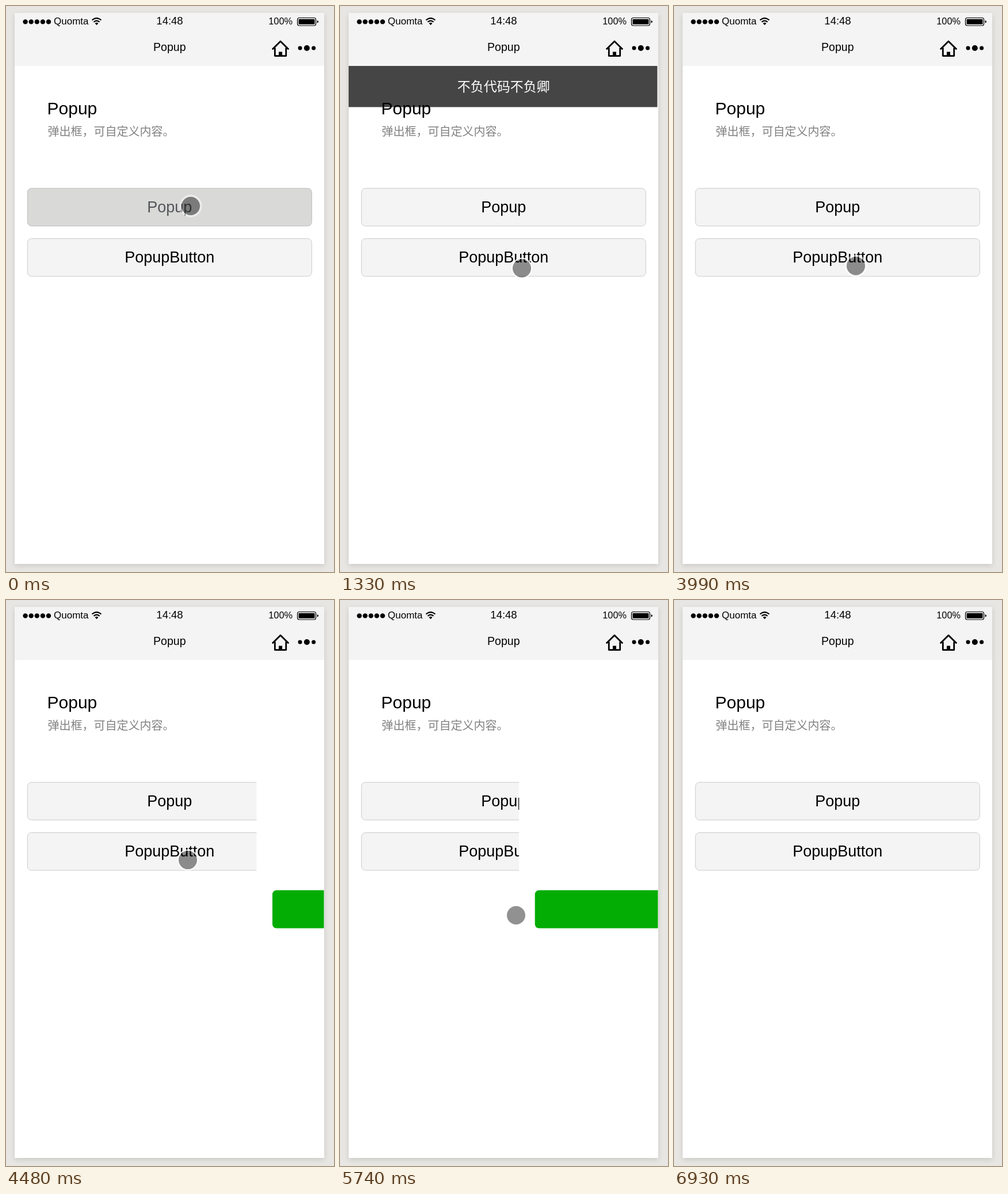
These frames come from a looping animation (570 px wide and 982 px high, 7 s). An HTML page:

```html
<!DOCTYPE html>
<html lang="zh-CN">
<head>
<meta charset="utf-8">
<title>Popup</title>
<style>
  html, body { margin: 0; width: 100%; height: 100%; overflow: hidden; background: #e7e6e2; }
  .phone { position: absolute; left: 15px; top: 12px; width: 538px; height: 956px;
    background: #fff; box-shadow: 0 3px 9px rgba(0, 0, 0, .13); }
  svg { position: absolute; left: 0; top: 0; display: block; }
  text { font-family: "Liberation Sans", "Noto Sans CJK SC", "Noto Sans CJK", sans-serif; }
  .mid { text-anchor: middle; }
  .btn rect { fill: #f4f4f4; stroke: #cbcbcb; }
  .btn text { font-size: 27px; }
  .btn.down rect { fill: #d9d9d8; stroke: #bcbcbc; }
  .btn.down text { fill: #53565a; }
  .close rect { fill: #03ad03; }
  .close text { font-size: 26.5px; fill: #fff; }
  .close.down rect { fill: #03a603; }
  .close.down text { fill: #b6e2b6; }
</style>
</head>
<body>
<div class="phone"></div>
<svg width="570" height="982" viewBox="0 0 570 982">
  <defs>
    <clipPath id="page"><rect x="15" y="104" width="537.5" height="864"/></clipPath>
  </defs>

  <rect x="15" y="12" width="538" height="92" fill="#f4f4f4"/>
  <g id="signal"></g>
  <text x="83" y="32.3" font-size="17">Quomta</text>
  <g fill="none" stroke="#000" stroke-width="2">
    <path d="M149.5 24.6 Q157.5 17.6 165.5 24.6"/>
    <path d="M152.4 27.8 Q157.5 23.4 162.6 27.8"/>
  </g>
  <path d="M154.6 30 Q157.5 27.6 160.4 30 L157.5 33.2 Z"/>
  <text class="mid" x="284.5" y="32.3" font-size="18.5">14:48</text>
  <text x="456.3" y="32.3" font-size="16.3">100%</text>
  <rect x="506.5" y="20.5" width="32" height="13.5" rx="3" fill="none" stroke="#000" stroke-width="1.2"/>
  <rect x="508.5" y="22.8" width="28" height="9" rx="1"/>
  <path d="M540.6 25 Q543 25.6 543 27.3 Q543 29 540.6 29.6 Z"/>

  <text class="mid" x="284.3" y="78" font-size="19.5">Popup</text>
  <path d="M462.8 75.2 L477 61.2 L491.2 75.2 M467.3 72.5 V86.6 H486.7 V72.5"
    fill="none" stroke="#000" stroke-width="2.8" stroke-linejoin="round"/>
  <rect x="474" y="79.5" width="6" height="7.5"/>
  <circle cx="511" cy="73" r="3.5"/>
  <circle cx="522.8" cy="73" r="5"/>
  <circle cx="534.6" cy="73" r="3.5"/>

  <g clip-path="url(#page)">
    <text x="71.5" y="188.3" font-size="30">Popup</text>
    <text x="72.5" y="224.6" font-size="20" fill="#808080">弹出框，可自定义内容。</text>
    <g class="btn" id="first">
      <rect x="37.3" y="316.3" width="494" height="65.4" rx="7"/>
      <text class="mid" x="284.3" y="358">Popup</text>
    </g>
    <g class="btn" id="second">
      <rect x="37.3" y="403.6" width="494" height="65.4" rx="7"/>
      <text class="mid" x="284.3" y="445.4">PopupButton</text>
    </g>
    <g id="bar">
      <rect x="15" y="104" width="536.5" height="71.4" fill="#000" fill-opacity=".73"/>
      <text class="mid" x="284.3" y="148.3" font-size="23" fill="#fff">不负代码不负卿</text>
    </g>
    <g id="panel">
      <rect x="15" y="104" width="538" height="864" fill="#fff"/>
      <g class="close" id="close">
        <rect x="42.5" y="503.6" width="483.2" height="66" rx="7"/>
        <text class="mid" x="284.2" y="546">关闭</text>
      </g>
    </g>
  </g>

  <g id="dot">
    <circle id="ring" fill="none" stroke="#fff"/>
    <circle r="16" fill="#000" fill-opacity=".43"/>
  </g>
</svg>
<script>
const LOOP = 7000, STEP = 70, SLIDE = 400;
const BAR_H = 71.4, PANEL_W = 537;
const bar = { show: 100, hide: 3105 };
const panel = { show: 4414, hide: 5612 };

// time, x, y of the touch dot
const path = [
  [0, 321, 347], [70, 321, 347], [770, 318, 434], [1050, 316, 455],
  [1400, 316, 455], [3150, 316, 453], [3500, 316, 451], [4414, 316, 451],
  [5180, 316, 455], [5530, 306, 547], [6160, 306, 547], [6860, 306, 588]
];

const $ = id => document.getElementById(id);
const within = (t, a, b) => t >= a && t < b;
const move = (el, x, y) => el.setAttribute('transform', `translate(${x} ${y})`);

// cubic-bezier(.25, .1, .25, 1)
function ease(x) {
  if (x <= 0) return 0;
  if (x >= 1) return 1;
  const curve = (s, a, b) => 3 * s * (1 - s) ** 2 * a + 3 * s * s * (1 - s) * b + s ** 3;
  let lo = 0, hi = 1;
  for (let i = 0; i < 24; i++) {
    const s = (lo + hi) / 2;
    if (curve(s, .25, .25) < x) lo = s; else hi = s;
  }
  return curve(lo, .1, 1);
}

const shown = (t, p) => ease((t - p.show) / SLIDE) - ease((t - p.hide) / SLIDE);

function along(t) {
  const i = path.findIndex(p => p[0] > t);
  if (i < 0) return path[path.length - 1].slice(1);
  const [t0, x0, y0] = path[i - 1], [t1, x1, y1] = path[i];
  const k = (t - t0) / (t1 - t0), s = k * k * (3 - 2 * k);
  return [x0 + (x1 - x0) * s, y0 + (y1 - y0) * s];
}

function draw(t) {
  move($('bar'), 0, -BAR_H * (1 - shown(t, bar)));
  move($('panel'), PANEL_W * (1 - shown(t, panel)), 0);

  $('first').classList.toggle('down', t < 70);
  $('second').classList.toggle('down', within(t, 4130, 4270));
  $('close').classList.toggle('down', within(t, 5460, 5530));

  const pressed = t < 70 || within(t, 3990, 4270) || within(t, 5460, 5530);
  const w = pressed ? 3.5 : 2.2;
  $('ring').setAttribute('r', 16 + w / 2);
  $('ring').setAttribute('stroke-width', w);
  $('ring').setAttribute('stroke-opacity', pressed ? .5 : .85);
  move($('dot'), ...along(t));
  $('dot').style.visibility = t < 6930 ? 'visible' : 'hidden';
}

for (let i = 0; i < 5; i++) {
  const c = document.createElementNS('http://www.w3.org/2000/svg', 'circle');
  c.setAttribute('cx', 33.6 + i * 10.1);
  c.setAttribute('cy', 27.4);
  c.setAttribute('r', 4.2);
  $('signal').append(c);
}

const start = performance.now();
function tick() {
  const t = (performance.now() - start) % LOOP;
  draw(Math.floor(t / STEP) * STEP);
  requestAnimationFrame(tick);
}
tick();
</script>
</body>
</html>
```
